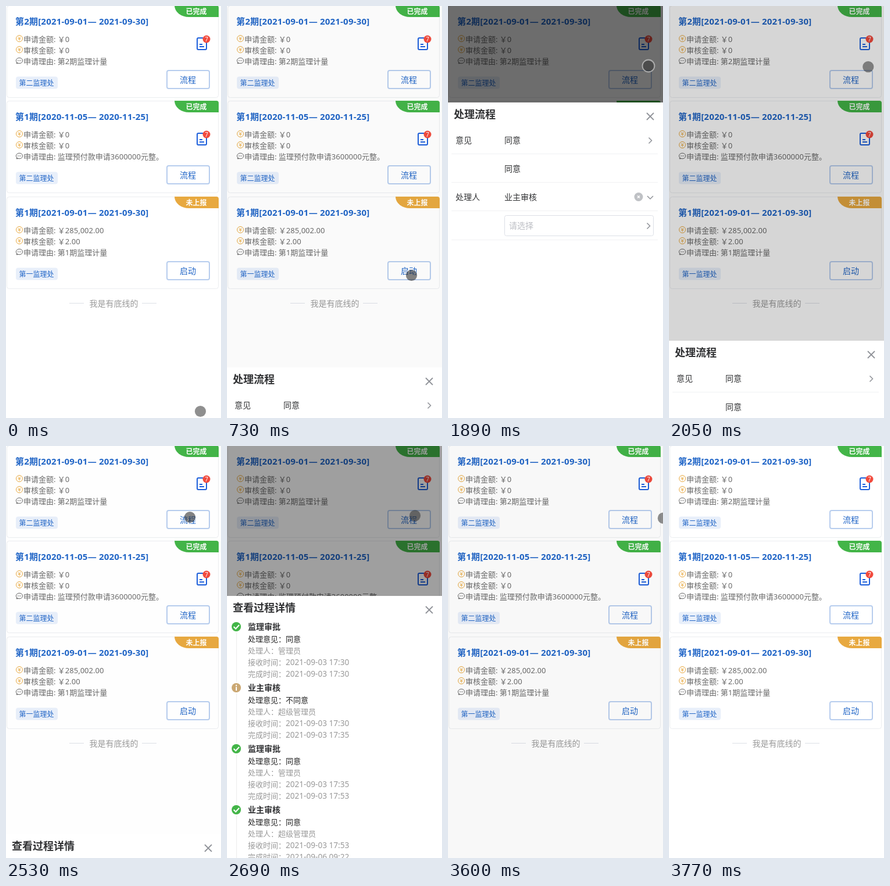
An HTML page with a canvas that plays this animation: 370 px wide and 709 px high, repeating every 4350 ms.

```html
<!DOCTYPE html>
<html lang="zh-CN">
<head>
<meta charset="utf-8">
<style>
html, body { margin: 0; width: 100%; height: 100%; overflow: hidden; background: #fff; }
canvas { display: block; }
</style>
</head>
<body>
<canvas id="stage" width="370" height="709"></canvas>
<script>
const ctx = document.getElementById('stage').getContext('2d');
const W = 370, H = 709, LOOP = 4350;
const SHEET_TOP = 69, SHEET_HEIGHT = H - SHEET_TOP;
const DARK = '#303133', GRAY = '#909399', BLUE = '#2065c7', GREEN = '#43b548', ORANGE = '#e8a940';

const clamp = v => Math.max(0, Math.min(1, v));
const smooth = v => { v = clamp(v); return v * v * (3 - 2 * v); };

// The y of a text is the middle of its line.
function text(str, x, y, size, color, { bold = false, align = 'left', spacing = 0 } = {}) {
  ctx.font = `${bold ? 700 : 400} ${size}px "Noto Sans", "Noto Sans CJK SC", "Noto Sans CJK", sans-serif`;
  ctx.letterSpacing = spacing + 'px';
  ctx.textAlign = align;
  ctx.fillStyle = color;
  ctx.fillText(str, x, y + size * 0.37);
}

function box(x, y, w, h, radius, fill, stroke, width = 1) {
  ctx.beginPath();
  ctx.roundRect(x, y, w, h, radius);
  paint(fill, stroke, width);
}

function disc(x, y, r, fill, stroke, width = 1) {
  ctx.beginPath();
  ctx.arc(x, y, r, 0, 7);
  paint(fill, stroke, width);
}

function paint(fill, stroke, width) {
  if (fill) { ctx.fillStyle = fill; ctx.fill(); }
  if (stroke) { ctx.strokeStyle = stroke; ctx.lineWidth = width; ctx.stroke(); }
}

function line(color, width, ...points) {
  ctx.beginPath();
  points.forEach(([x, y]) => ctx.lineTo(x, y));
  paint(null, color, width);
}

function cross(x, y, r, color, width) {
  line(color, width, [x - r, y - r], [x + r, y + r]);
  line(color, width, [x - r, y + r], [x + r, y - r]);
}

const chevronRight = (x, y) => line(GRAY, 1.5, [x - 2.5, y - 5], [x + 2.5, y], [x - 2.5, y + 5]);
const chevronDown = (x, y) => line(GRAY, 1.5, [x - 5, y - 2.5], [x, y + 2.5], [x + 5, y - 2.5]);

function coin(x, y) {
  disc(x, y, 5.5, null, ORANGE);
  line(ORANGE, 1, [x - 2.2, y - 3], [x, y - 0.5], [x + 2.2, y - 3]);
  line(ORANGE, 1, [x, y - 0.5], [x, y + 3.5]);
  line(ORANGE, 1, [x - 2.5, y + 0.5], [x + 2.5, y + 0.5]);
}

function bubble(x, y) {
  ctx.beginPath();
  ctx.ellipse(x, y, 5.7, 4.8, 0, 0, 7);
  paint(null, '#666', 1);
  line('#666', 1, [x - 4.5, y + 3], [x - 5, y + 5], [x - 2, y + 4.6]);
  for (const dx of [-2.5, 0, 2.5]) disc(x + dx, y, 0.7, '#555');
}

function documentIcon(y) {
  const blue = '#1d5fdb';
  box(329, y - 10, 16, 20, 2, null, blue, 2);
  line(blue, 2, [333, y + 1], [338, y + 1]);
  line(blue, 2, [333, y + 5], [341, y + 5]);
  disc(345, y - 8, 6.5, '#f24a3d');
  text('7', 345, y - 8, 10, '#fff', { align: 'center' });
}

const cards = [
  { y: -1, title: '第2期[2021-09-01— 2021-09-30]', asked: '0', passed: '0', reason: '第2期监理计量', office: '第二监理处', done: true },
  { y: 163, title: '第1期[2020-11-05— 2020-11-25]', asked: '0', passed: '0', reason: '监理预付款申请3600000元整。', office: '第二监理处', done: true },
  { y: 328, title: '第1期[2021-09-01— 2021-09-30]', asked: '285,002.00', passed: '2.00', reason: '第1期监理计量', office: '第一监理处', done: false },
];

function drawCard({ y, title, asked, passed, reason, office, done }) {
  box(1.5, y + 0.5, 364, 158, 4, '#fff', '#ebedf0');
  box(290, y, 76, 20, [0, 4, 0, { x: 25, y: 20 }], done ? GREEN : ORANGE);
  text(done ? '已完成' : '未上报', 327.5, y + 10.5, 12, '#fff', { bold: true, align: 'center' });
  text(title, 16, y + 27.5, 15, BLUE, { bold: true, spacing: 0.2 });
  coin(23, y + 57);
  coin(23, y + 76);
  bubble(23, y + 95);
  const rows = ['申请金额: ￥' + asked, '审核金额: ￥' + passed, '申请理由: ' + reason];
  rows.forEach((row, i) => text(row, 30, y + 58 + i * 19, 13, '#6a6a6a'));
  box(17, y + 122.5, 72, 21, 4, '#e8effa');
  text(office, 22.5, y + 134, 12, BLUE);
  box(277, y + 112, 73, 31, 3, '#fff', '#b7cdee', 2);
  text(done ? '流程' : '启动', 313, y + 127.5, 14, BLUE, { align: 'center' });
  if (done) documentIcon(y + 66);
}

function drawPage() {
  ctx.fillStyle = '#fff';
  ctx.fillRect(0, 0, W, H);
  cards.forEach(drawCard);
  line('#dcdfe6', 1, [109, 511.5], [134, 511.5]);
  line('#dcdfe6', 1, [234, 511.5], [259, 511.5]);
  text('我是有底线的', 143.5, 512, 14, '#999');
}

function drawForm(y) {
  for (const dy of [88.5, 137.5, 186.5, 236.5]) line('#f0f1f3', 1, [6, y + dy], [361, y + dy]);
  text('意见', 13, y + 65, 14, DARK);
  text('同意', 97, y + 65, 14, DARK);
  chevronRight(348, y + 65.5);
  text('同意', 97, y + 114, 14, DARK);
  text('处理人', 13, y + 163, 14, DARK);
  text('业主审核', 97, y + 163, 14, DARK);
  disc(328, y + 162.5, 7.5, '#bfc1c5');
  cross(328, y + 162.5, 2, '#fff', 1.5);
  chevronDown(348, y + 163.5);
  box(97.5, y + 194.5, 256, 35, 3, '#fff', '#dcdfe6');
  text('请选择', 105, y + 212, 14, '#bcbec4');
  chevronRight(345, y + 212.5);
  box(294.5, y + 605.5, 71, 40, 5, '#fff', '#c0c0c0');
  text('发送', 330, y + 625.5, 15, '#606266', { align: 'center' });
}

const steps = [
  ['监理审批', '同意', '管理员', '03 17:30', '03 17:30'],
  ['业主审核', '不同意', '超级管理员', '03 17:30', '03 17:35'],
  ['监理审批', '同意', '管理员', '03 17:35', '03 17:53'],
  ['业主审核', '同意', '超级管理员', '03 17:53', '06 09:22'],
];

function drawHistory(top) {
  steps.forEach(([name, opinion, person, received, finished], i) => {
    const y = top + 53 + i * 105, ok = opinion === '同意';
    line('#ebebeb', 1, [16.5, y + 10], [16.5, y + (i < 3 ? 95 : 92)]);
    disc(16, y, 8, ok ? GREEN : '#cba873');
    if (ok) {
      line('#fff', 2, [11.5, y], [15, y + 3.5], [21, y - 3]);
    } else {
      disc(16, y - 4, 1.2, '#fff');
      line('#fff', 2, [16, y - 1.5], [16, y + 5]);
    }
    text(name, 36, y, 14, DARK, { bold: true });
    text('处理意见：' + opinion, 36, y + 21, 13, '#222');
    text('处理人：' + person, 36, y + 41, 13, '#999');
    text('接收时间：', 36, y + 61, 13, '#999');
    text('2021-09-' + received, 101, y + 61, 13.6, '#999');
    text('完成时间：', 36, y + 81, 13, '#999');
    text('2021-09-' + finished, 101, y + 81, 13.6, '#999');
  });
}

const sheets = [
  { open: 696.1, close: 1852, title: '处理流程', body: drawForm },
  { open: 2514, close: 3263.5, title: '查看过程详情', body: drawHistory },
];

// The panel slides linearly in 250 ms, the mask fades in 300 ms.
function drawSheet({ open, close, title, body }, t) {
  const shown = clamp((t - open) / 250) - clamp((t - close) / 250);
  const mask = smooth((t - open) / 300) - smooth((t - close) / 300);
  ctx.fillStyle = `rgba(0,0,0,${0.6 * mask})`;
  ctx.fillRect(0, 0, W, H);
  if (shown <= 0) return;
  const y = Math.round(H - SHEET_HEIGHT * shown);
  ctx.fillStyle = '#fff';
  ctx.fillRect(0, y, W, SHEET_HEIGHT);
  text(title, 10, y + 20.5, 18, DARK, { bold: true });
  cross(348, y + 24, 6, GRAY, 1.8);
  body(y);
}

// Pointer stops: time, x, y
const pointer = [
  [0, 335, 697], [480, 316, 461], [560, 318, 463], [970, 318, 463], [1230, 162, 134],
  [1810, 345, 103], [1980, 345, 103], [2450, 317, 122], [2610, 317, 122], [2930, 362, 105],
  [3030, 370, 106], [3120, 385, 107], [3280, 354, 128], [3440, 354, 128], [3600, 385, 120],
];
const within = (t, a, b) => t >= a && t <= b;

function drawPointer(t) {
  const next = pointer.findIndex(stop => stop[0] > t);
  if (next < 0) return;
  const [t0, x0, y0] = pointer[next - 1], [t1, x1, y1] = pointer[next];
  const k = smooth((t - t0) / (t1 - t0));
  const x = x0 + (x1 - x0) * k, y = y0 + (y1 - y0) * k;
  const pressed = within(t, 560, 800) || within(t, 2450, 2600);
  disc(x - 0.5, y + 0.5, 9.6, `rgba(48,48,48,${pressed ? 0.6 : 0.54})`);
  if (within(t, 1810, 1900)) disc(x, y, 10.5, null, 'rgba(185,185,185,.85)', 1.8);
}

// Screen updates come in runs: first time, last time, number of intervals
const runs = [
  [0, 560, 7], [730, 1230, 6], [1310, 1810, 6], [1890, 2370, 6],
  [2450, 2930, 6], [3030, 3120, 1], [3280, 3770, 6],
];

function lastUpdate(t) {
  const [first, last, count] = runs.filter(run => run[0] <= t).pop();
  const gap = (last - first) / count;
  return first + Math.min(count, Math.floor((t - first) / gap + 1e-6)) * gap;
}

function draw() {
  const t = lastUpdate(performance.now() % LOOP);
  drawPage();
  sheets.forEach(sheet => drawSheet(sheet, t));
  drawPointer(t);
  requestAnimationFrame(draw);
}
draw();
</script>
</body>
</html>
```
